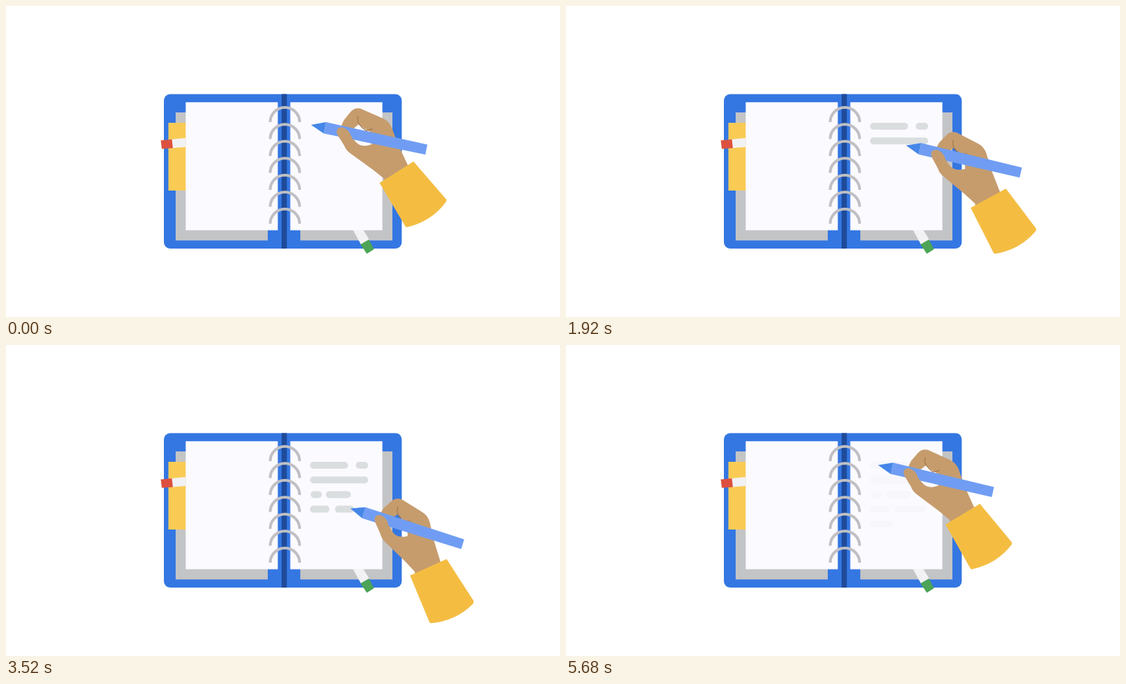
An HTML page that plays this animation: 800 px wide and 450 px high, repeating every 5.76 s.

```html
<!DOCTYPE html>
<html lang="en">
<head>
<meta charset="utf-8">
<title>Writing in a notebook</title>
<style>
  html, body { margin: 0; width: 100%; height: 100%; overflow: hidden; background: #fff; }
  svg { display: block; width: 100vw; height: 100vh; }
  #notes { stroke: #dadedf; stroke-width: 10; stroke-linecap: round; }
  .skin { fill: #c69c6d; }
  .crease { fill: none; stroke: #a67b4c; stroke-width: 1.3; stroke-linecap: round; }
</style>
</head>
<body>
<svg viewBox="0 0 800 450">
  <!-- notebook -->
  <rect x="228" y="127.500" width="343.500" height="223.500" rx="9" fill="#3477e2"/>
  <path d="M245 154h133v185.300h-133zM425 154h133v185.300h-133z" fill="#c3c4c6"/>
  <rect x="398" y="127.500" width="7.500" height="223.500" fill="#1f4b99"/>
  <rect x="234.500" y="169" width="26" height="98" fill="#f9cb55"/>
  <path d="M259.500 139.300H392.500V324.500H259.500zM410.500 139.300H543.500V324.500H410.500z" fill="#fbfaff"/>
  <path d="M239 193l20.500-2v13l-19.500 1.500z" fill="#f2f2f5"/>
  <path d="M223.500 194.500l16-1.500 1.500 12.500-16 1.200z" fill="#dc503f"/>
  <path d="M501 324h15l8.500 14-12 7z" fill="#f2f2f5"/>
  <path d="M512 345l12-7 7.500 14-10.500 6.500z" fill="#4da456"/>
  <g id="rings" fill="none" stroke="#c0c0c4" stroke-width="4"></g>
  <g id="notes"></g>

  <!-- hand and pen, tip of the pen at 441,172 -->
  <g id="hand">
    <path class="skin" fill-rule="evenodd" d="M483 176L488 165L497 154Q503 146.500 512 148.500L544 162.500Q553 166.500 557 176L566 200L582 234L548 256L545 249L530 237L497 213Q491 209 488 201L478 185Q476 178 483 176Z
      M501 178L510 170.500Q516 177 525 181.500L528 200Q519 204 511 201Q503 197 499 187Z"/>
    <path class="crease" d="M508.500 160Q506.500 166 510 171Q515 177 520 180.500L529 178"/>
    <g id="pen">
      <path d="M462 168L608.500 200.500L605.500 215L459 184.500Z" fill="#709df3"/>
      <path d="M440.500 172L462 168L459 184.500Z" fill="#4586e8"/>
    </g>
    <path class="skin" d="M478 185Q475.500 176.500 484 175.500Q491 176 496 183L501 193L500 206L488 201Z"/>
    <path d="M588.500 225L635.500 279.500Q636.500 281.500 635 284Q614 312 579 320Q577.500 320 576.500 318.500L539.500 256Z" fill="#f4bd42"/>
  </g>
</svg>
<script>
const LOOP = 5760, STEP = 80;
const PACE = 0.112;            // writing speed, px per ms
const LEFT = 444, TOP = 174, LEADING = 21.2;
const FADE = 4640, LEAVE = 5120;
const home = { x: 441, y: 172, turn: 0 };
const rest = { x: 505, y: 267.6, turn: 9 };

// each word: from x, to x, turn of the hand at its end
const rows = [
  { start: 10, words: [[444, 489, 6], [510, 518, -16.6]] },
  { start: 1120, words: [[444, 518, 5.8]] },
  { start: 2170, words: [[445, 451, -1], [467, 493, -5]] },
  { start: 3040, words: [[444, 462, 2], [480, 515, 11]] },
  { start: 4130, words: [[444, 467, -4]] }
];

const $ = id => document.getElementById(id);
const clamp = v => Math.max(0, Math.min(1, v));
const mix = (a, b, k) => a + (b - a) * k;
const add = (parent, tag, attrs) => {
  const el = document.createElementNS('http://www.w3.org/2000/svg', tag);
  for (const name in attrs) el.setAttribute(name, attrs[name]);
  return parent.appendChild(el);
};

for (let i = 0; i < 7; i++) {
  add($('rings'), 'path', { d: `M381.500 ${168 + i * 24.5}a21.250 21.250 0 0 1 42.500 0` });
}

// the hand follows each row, then glides on to the next one
const path = [{ t: 0, ...home }];
const strokes = [];
rows.forEach(({ start, words }, i) => {
  const lineY = TOP + i * LEADING, y = lineY - 1;
  path.push({ t: start, x: LEFT, y, turn: 0 });
  for (const [from, to, turn] of words) {
    path.push({ t: start + (to - LEFT) / PACE, x: to, y, turn });
    strokes.push({ start, from, to, el: add($('notes'), 'line', { x1: from, y1: lineY, y2: lineY }) });
  }
});
path.push({ t: 4720, ...rest }, { t: LEAVE, ...rest });

function poseAt(t) {
  if (t >= LEAVE) {
    const k = (t - LEAVE) / (LOOP - LEAVE);
    return {
      x: mix(rest.x, home.x, k ** 1.3),
      y: mix(rest.y, home.y, Math.sin(k * Math.PI / 2)),
      turn: mix(rest.turn, home.turn, k)
    };
  }
  const i = path.findIndex(p => p.t > t);
  const a = path[i - 1], b = path[i];
  const k = (t - a.t) / (b.t - a.t);
  return { x: mix(a.x, b.x, k), y: mix(a.y, b.y, k), turn: mix(a.turn, b.turn, k) };
}

function draw(t) {
  const { x, y, turn } = poseAt(t);
  const tilt = -2.5 * clamp(Math.min(t - 880, 4320 - t) / 400);
  $('hand').setAttribute('transform', `translate(${x} ${y}) rotate(${turn}) translate(${-home.x} ${-home.y})`);
  $('pen').setAttribute('transform', `rotate(${tilt} ${home.x} ${home.y})`);

  for (const { start, from, to, el } of strokes) {
    const reach = LEFT + (t - start) * PACE;
    el.setAttribute('x2', Math.max(from + 0.01, Math.min(to, reach)));
    el.setAttribute('visibility', reach >= from ? 'visible' : 'hidden');
  }
  $('notes').setAttribute('opacity', 1 - 0.88 * clamp((t - FADE) / (LOOP - STEP - FADE)));
}

function tick() {
  const t = performance.now() % LOOP;
  draw(Math.floor(t / STEP) * STEP);
  requestAnimationFrame(tick);
}
tick();
</script>
</body>
</html>
```
